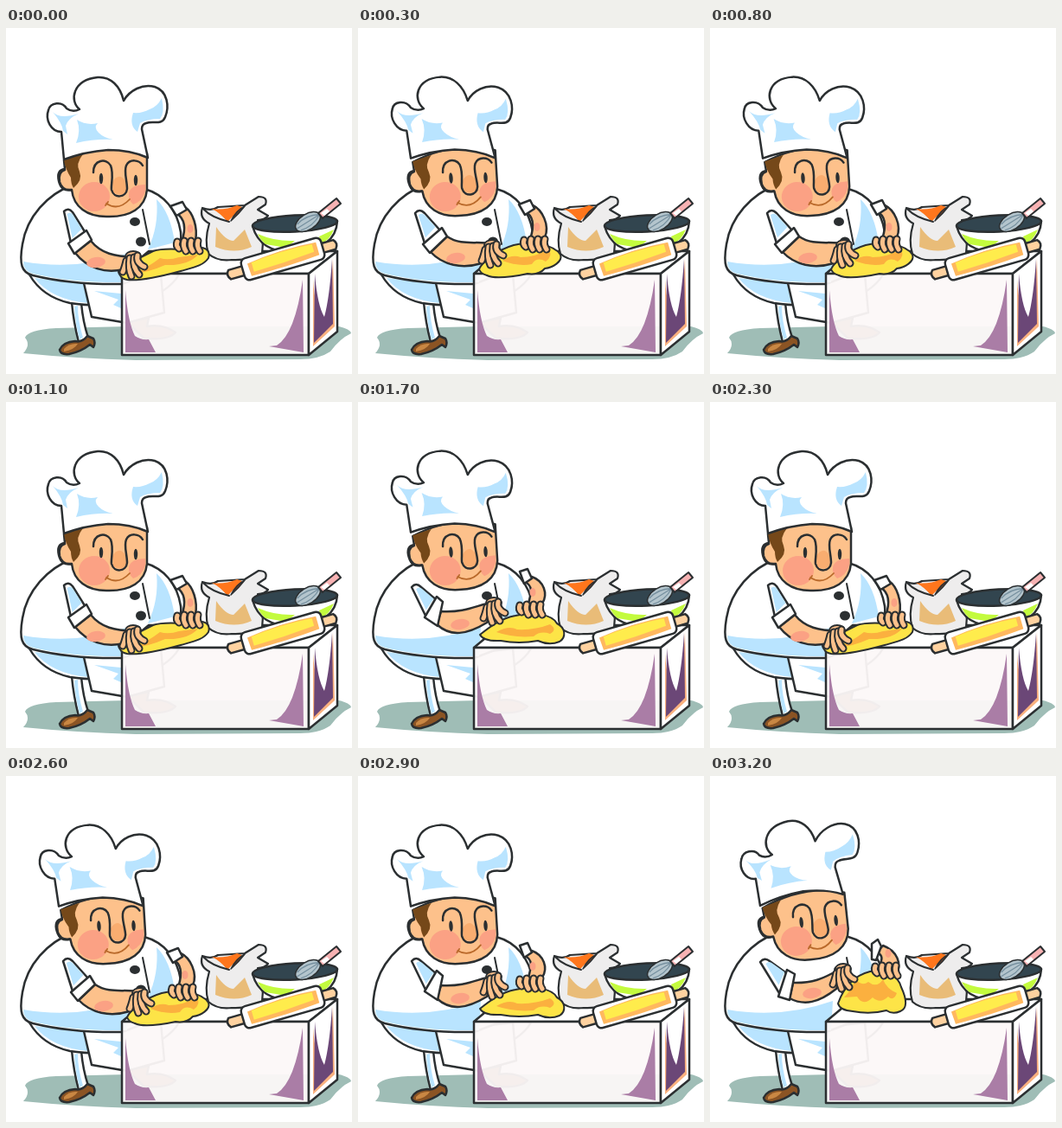
An HTML page that plays this animation: 400 px wide and 400 px high, repeating every 3.5 s.

```html
<!DOCTYPE html>
<html lang="en">
<head>
<meta charset="utf-8">
<title>Baker kneading dough</title>
<style>
html, body { margin: 0; width: 100%; height: 100%; overflow: hidden; background: #fff; }
svg { display: block; width: 100vw; height: 100vh; }
</style>
</head>
<body>
<svg id="stage" viewBox="0 0 400 400"></svg>
<script>
const INK = '#2b2f31', SKIN = '#fdc18b', BLUSH = '#fba184', SHADE = '#b9e4ff';
const stage = document.getElementById('stage');

const shape = (d, fill) => `<path d="${d}" fill="${fill}"/>`;
const outlined = (d, fill = '#fff', width = 2.5) =>
  `<path d="${d}" fill="${fill}" stroke="${INK}" stroke-width="${width}" stroke-linejoin="round" stroke-linecap="round"/>`;
const line = (d, width = 2.5) => outlined(d, 'none', width);
const oval = (x, y, rx, ry, fill, extra = '') =>
  `<ellipse cx="${x}" cy="${y}" rx="${rx}" ry="${ry}" fill="${fill}" ${extra}/>`;
const group = (transform, content) => `<g transform="${transform}">${content}</g>`;

const ground = shape('M20 376Q29 366 22 358Q25 349 58 347L140 345L385 345Q398 348 399 353Q386 359 375 374Q362 383 340 383L150 384Q80 382 20 376Z', '#9fbdb6');

const body =
  outlined('M76 317Q78 340 84 363L95 358Q89 340 87 318Z') +
  shape('M79 322Q80 342 85 360L89 358Q83 338 83 321Z', SHADE) +
  outlined('M62 372Q66 363 80 362Q88 364 94 356L101 359Q104 364 101 369L97 366Q87 374 73 377Q63 378 62 372Z', '#8b5424') +
  shape('M67 371Q73 364 83 365Q79 372 67 374Z', '#c98743') +
  outlined('M140 340L165 335L163 345Q182 342 196 352Q188 361 160 359Z', '#8b5424') +
  outlined('M27 285Q42 311 74 318Q105 323 150 318Q188 306 200 285L130 270Z') +
  shape('M33 289L91 296L95 318Q52 314 33 289Z', SHADE) +
  outlined('M90 295L99 334L140 341L183 329L179 285Z') +
  shape('M102 304L133 307L133 324L124 320L130 314Z', SHADE) +
  outlined('M78 181C48 192 24 218 19 250C15 273 18 283 31 286Q76 297 134 296L190 275Q204 255 202 236C198 210 182 192 160 186Z') +
  shape('M20 270Q82 281 142 260L140 294Q77 295 31 284Q20 281 20 270Z', SHADE) +
  shape('M174 198Q190 213 195 248L164 256Q177 229 174 198Z', SHADE) +
  line('M158 210L166 250', 2) +
  oval(149, 224, 6, 5, INK) + oval(156, 247, 6, 5.5, INK);

const face =
  outlined('M67 153L68 163Q58 164 61 177Q64 190 76 187C78 207 94 218 116 218C144 219 161 208 163 187L163 145Q117 130 67 153Z', SKIN) +
  shape('M67 152L89 146Q80 157 85 166Q89 176 78 185Q75 180 75 173Q68 162 67 152Z', '#754819') +
  oval(102, 195, 18, 17, BLUSH) +
  shape('M142 191Q144 181 161 181L161 189Q157 201 147 204Q141 199 142 191Z', BLUSH) +
  shape('M123 178Q131 166 138 177L139 188Q134 196 124 190Z', '#f9ad70') +
  line('M68 164Q60 166 62 178Q65 188 75 187') +
  line('M101 167C101 152 116 150 121 159C125 169 121 182 122 187C125 198 139 196 140 186C140 176 136 166 139 159C143 151 154 152 158 159') +
  oval(110, 174, 2.2, 6.3, INK) + oval(150, 176, 2.2, 6.3, INK) +
  `<path d="M116 203Q130 212 143 198M115 205L118 201" fill="none" stroke="#b9692a" stroke-width="1.8" stroke-linecap="round"/>`;

const hat =
  outlined('M67 152L64 120C52 120 45 106 49 95C51 86 65 84 70 93Q77 98 85 94C73 84 77 60 106 57C121 56 132 67 136 84C143 72 158 64 172 68C187 73 189 91 184 103C180 113 170 107 162 110Q157 111 157 117L164 150Q144 141 118 141Q91 143 67 152Z') +
  shape('M54 97Q62 106 84 99Q72 104 69 113L71 123L66 119Q65 110 54 97Z', SHADE) +
  shape('M82 106Q93 113 106 110Q101 115 107 121Q113 127 124 129Q103 128 81 133Q87 119 82 106Z', SHADE) +
  shape('M180 81Q184 98 178 105Q163 105 155 110L152 120Q142 113 147 98Q157 99 166 94Q175 91 180 81Z', SHADE);

const table =
  outlined('M134 284L165 258L383 258L350 284Z') +
  `<path d="M134 284H350V378H134Z" fill="#fcf8f8" fill-opacity=".95"/>` +
  shape('M138 303Q141 340 149 356Q156 361 165 360L173 375L138 375Z', '#aa7da6') +
  shape('M343 291Q334 354 313 367L304 368L344 375Z', '#aa7da6') +
  line('M134 284H350V378H134Z') +
  outlined('M350 284L383 258V351L350 378Z') +
  shape('M355 290Q357 327 368 335Q376 313 378 266L380 345L355 368Z', '#f9b17f') +
  shape('M357 284Q360 321 368 334Q374 312 377 267L378 342L356 364Z', '#6b4777');

const bag =
  outlined('M227 208Q238 212 245 207L276 205L292 195Q303 195 300 204L291 210L303 217Q299 222 291 222Q299 241 296 261Q281 269 261 268Q244 270 234 261Q229 246 235 226Q223 220 227 208Z', '#eeeded', 2.2) +
  shape('M238 209Q253 211 267 205L273 207L256 224Q248 214 238 209Z', '#ff761c') +
  outlined('M276 206Q266 211 260 223Q269 215 276 206Z', '#74422b', 1.5) +
  line('M228 209Q237 219 258 224', 2) +
  shape('M243 230Q254 246 263 246L276 233L284 253Q264 262 242 253Z', '#e9bc78');

const bowl =
  outlined('M285 229C291 250 306 259 334 260C363 257 382 246 383 223Z') +
  shape('M291 238Q311 247 334 246L324 254L300 250Q294 245 291 238ZM362 241L379 233Q374 246 364 249Z', '#c3fb3e') +
  oval(334, 226, 49, 9.5, '#32454f', `stroke="${INK}" stroke-width="2.5" transform="rotate(-3 334 226)"`) +
  group('rotate(-32 349 224)',
    oval(349, 224, 16, 9, '#b4c5cd', `stroke="${INK}" stroke-width="1.5"`) +
    `<path d="M334 224H365M337 220Q351 216 365 224M337 228Q351 232 365 224" fill="none" stroke="#76909f" stroke-width="1.3"/>`) +
  outlined('M361 214L382 197L387 203L366 220Z', '#f7b2b3', 2) +
  shape('M364 214L371 209L374 212L368 217Z', '#fff');

const roller = group('rotate(-16 320 267)',
  outlined('M256 262Q251 267 256 273H274V262ZM366 262H382Q387 267 382 273H366Z', '#ffd2a0') +
  `<rect x="272" y="254" width="96" height="26" rx="6" fill="#fff" stroke="${INK}" stroke-width="2.5"/>` +
  shape('M279 261Q320 255 362 259V274Q325 277 280 276Z', '#ffb85e') +
  shape('M284 261Q320 257 357 260V269Q320 272 284 272Z', '#ffec4c'));

// Each finger is a rounded stroke laid over a wider ink stroke.
const finger = d => [[9, INK], [5, SKIN]].map(([width, color]) =>
  `<path d="${d}" fill="none" stroke="${color}" stroke-width="${width}" stroke-linecap="round"/>`).join('');
const leftHand =
  oval(13, -1, 9, 6, SKIN, `stroke="${INK}" stroke-width="2"`) +
  [[5, 4, 1, 17], [9, 1, 11, 22], [14, 0, 20, 20], [18, -2, 26, 11]]
    .map(([x, y, tipX, tipY]) => finger(`M${x} ${y}Q${x - 2} ${(y + tipY) / 2 + 2} ${tipX} ${tipY}`)).join('');
const rightHand = [0, 8, 16, 24]
  .map((x, i) => finger(`M${x} ${i ? 0 : 1}Q${x - 2} 6 ${x + 2} ${i ? 12 : 9}`)).join('');

const poses = {
  rolled: {
    face: '', hat: '',
    dough: 'M132 286Q126 279 138 274L170 258C185 253 201 257 215 256C229 250 237 257 234 266C228 275 216 277 202 281C180 287 156 293 140 291Q134 290 132 286Z',
    crease: 'M148 284Q165 276 178 266Q188 269 200 265L222 262Q211 275 184 274Q166 282 148 284Z',
    sleeve: 'M67 212Q72 207 77 213L92 237L76 253Z', cuff: 'M72 249L93 234L99 245L79 261Z',
    forearm: 'M80 260C94 278 115 284 136 279L148 265C126 264 110 261 98 246Z', blush: [104, 271],
    rightArm: 'M197 214C209 222 207 236 203 247L219 246C222 230 216 213 207 207Z',
    rightCuff: 'M190 206L204 201L209 210L197 217Z', left: [134, 265], right: [198, 246]
  },
  pressed: {
    face: 'rotate(-3.5 100 215)', hat: 'matrix(1.007 .017 .055 .997 -14.8 -2)',
    dough: 'M140 279C144 269 163 256 180 251C201 246 226 250 234 262C237 270 225 277 216 278Q209 286 196 284C177 288 157 290 149 286Q142 284 140 279Z',
    crease: 'M167 269Q178 261 188 265Q205 265 220 256Q226 263 217 270Q207 264 201 273Q185 276 167 269Z',
    sleeve: 'M66 214Q71 208 77 214L95 234L78 252Z', cuff: 'M75 250L97 231L103 241L83 260Z',
    forearm: 'M84 259C98 274 120 279 143 272L158 250C138 245 121 253 103 241Z', blush: [113, 266],
    rightArm: 'M193 212C205 218 203 232 199 244L216 242C222 228 213 210 202 205Z',
    rightCuff: 'M186 204L199 199L204 209L193 216Z', left: [142, 252], right: [192, 244]
  },
  gathered: {
    face: 'rotate(-3.5 100 215)', hat: 'matrix(1.007 .017 .055 .997 -14.8 -2)',
    dough: 'M141 269C151 261 165 250 182 247C204 242 225 246 230 256C240 261 241 272 233 277Q221 282 208 276Q186 280 165 276Q145 277 141 269Z',
    crease: 'M160 266Q174 258 184 263Q204 264 222 257Q231 263 222 268Q211 264 203 271Q180 273 160 266Z',
    sleeve: 'M62 214Q67 208 73 214L92 230L79 249Z', cuff: 'M77 249L91 225L98 231L92 259Z',
    forearm: 'M91 257C107 272 126 269 149 255L158 232C141 232 128 244 96 242Z', blush: [118, 257],
    rightArm: 'M193 208C205 214 198 225 197 234L213 233C220 222 215 207 201 202Z',
    rightCuff: 'M187 196L196 193L201 204L192 210Z', left: [144, 233], right: [187, 234]
  },
  lifted: {
    face: 'translate(0 -4) rotate(-6 100 215)', hat: 'matrix(.989 -.114 .068 .982 -18.6 8.3)',
    dough: 'M148 263C154 246 165 231 185 226C205 223 218 232 221 244C228 259 228 269 220 272Q211 276 204 271Q185 276 165 272Q150 271 148 263Z',
    crease: 'M155 256Q165 246 168 234Q175 244 183 238Q193 246 200 235Q204 246 216 251Q212 261 206 255Q197 264 188 256Q177 267 170 255Z',
    sleeve: 'M58 215Q63 209 69 214L90 229L80 251Z', cuff: 'M79 255L89 224L98 229L92 259Z',
    forearm: 'M92 257C109 266 126 262 146 246L156 222C141 225 131 240 96 239Z', blush: [118, 251],
    rightArm: 'M193 204C204 209 195 217 195 224L215 231C223 217 216 202 200 196Z',
    rightCuff: 'M187 194L194 189L198 197L192 213L187 212Z', left: [141, 224], right: [191, 219]
  }
};

const drawPose = p =>
  body + group(p.face, face) + group(p.hat, hat) +
  table + bag + bowl + roller +
  outlined(p.rightArm, SKIN) + oval(p.right[0] + 15, p.right[1] - 14, 3.5, 5, BLUSH) + outlined(p.rightCuff) +
  outlined(p.dough, '#fde447', 2) + shape(p.crease, '#fbb03f') +
  outlined(p.sleeve) + group('translate(25 71) scale(.68)', shape(p.sleeve, SHADE)) +
  outlined(p.forearm, SKIN) + oval(...p.blush, 11, 6, BLUSH, `transform="rotate(-8 ${p.blush})"`) +
  outlined(p.cuff) +
  group(`translate(${p.left})`, leftHand) + group(`translate(${p.right})`, rightHand);

stage.innerHTML = ground +
  Object.entries(poses).map(([name, p]) => `<g id="${name}">${drawPose(p)}</g>`).join('');

const LOOP = 3500;
const steps = [
  [0, 'rolled'], [300, 'pressed'], [600, 'rolled'], [800, 'pressed'],
  [1100, 'rolled'], [1400, 'pressed'], [1700, 'gathered'], [2000, 'lifted'],
  [2300, 'rolled'], [2600, 'pressed'], [2900, 'gathered'], [3200, 'lifted']
];

function render() {
  const time = performance.now() % LOOP;
  const current = steps.findLast(([start]) => start <= time)[1];
  for (const name in poses) {
    document.getElementById(name).style.display = name === current ? '' : 'none';
  }
  requestAnimationFrame(render);
}
render();
</script>
</body>
</html>
```
